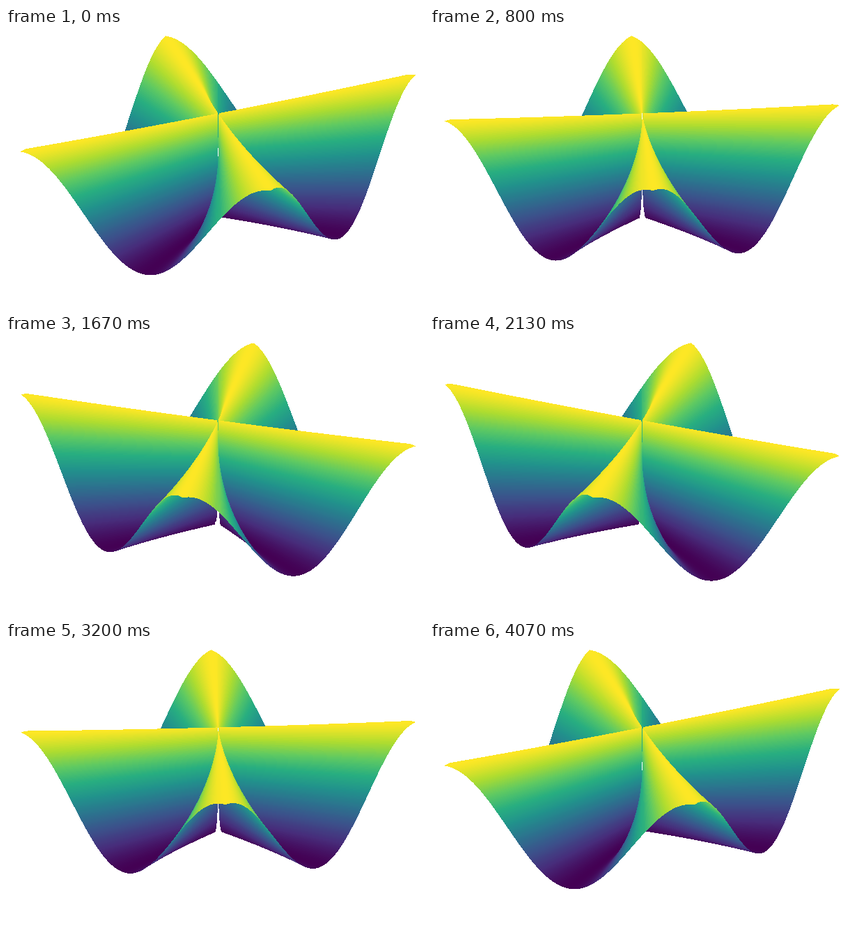
Animation, 600 px wide and 400 px high, one loop 4.14 s. Source, as an HTML page:

```html
<!DOCTYPE html>
<html lang="en">
<head>
<meta charset="utf-8">
<title>Swaying conoid</title>
<style>
  html, body { margin: 0; width: 100%; height: 100%; overflow: hidden; background: #fff; }
  svg { display: block; width: 600px; height: 400px; }
</style>
</head>
<body>
<svg viewBox="0 0 600 400" shape-rendering="crispEdges"><g id="surface"></g></svg>
<script>
const LOOP = 4140, STEPS = 62, STEP_MS = 200 / 3;
const CENTER = { x: 304.6, y: 122.4 };
const HALF_WIDTH = 283.4, HALF_DEPTH = 111, HEIGHT = 148.3;
const PER_EDGE = 240, COUNT = PER_EDGE * 4;

const VIRIDIS = ['440154', '472d7b', '3b528b', '2c728e', '21918c', '28ae80', '5ec962', 'addc30', 'fde725']
  .map(hex => [0, 2, 4].map(i => parseInt(hex.slice(i, i + 2), 16)));

const surface = document.getElementById('surface');
const heightAt = s => (1 + Math.cos(2 * Math.PI * s)) / 2;

function viridis(v) {
  const x = v * (VIRIDIS.length - 1);
  const i = Math.min(VIRIDIS.length - 2, Math.floor(x));
  const mix = VIRIDIS[i].map((c, n) => Math.round(c + (VIRIDIS[i + 1][n] - c) * (x - i)));
  return `rgb(${mix})`;
}

// Each wedge spans the axis and a short piece of the rim, so it has one height and one colour.
const wedges = Array.from({ length: COUNT }, (_, i) => {
  const path = document.createElementNS('http://www.w3.org/2000/svg', 'path');
  path.setAttribute('fill', viridis(heightAt((i + 0.5) / PER_EDGE)));
  return { path, index: i, depth: 0 };
});

function rim(s, corners) {
  s = (s + 4) % 4;
  const i = Math.floor(s), t = s - i;
  const a = corners[i], b = corners[(i + 1) % 4];
  return [a[0] + (b[0] - a[0]) * t, a[1] + (b[1] - a[1]) * t];
}

function draw(angle) {
  const dx = 220 * Math.sin(angle), dy = 161 * Math.sin(angle);
  const corners = [[-HALF_WIDTH, dy], [dx, HALF_DEPTH], [HALF_WIDTH, -dy], [-dx, -HALF_DEPTH]];

  const project = (s, radius) => {
    const [x, y] = rim(s, corners);
    const drop = HEIGHT * (1 - heightAt(s));
    return `${(CENTER.x + x * radius).toFixed(2)} ${(CENTER.y + y * radius + drop).toFixed(2)}`;
  };
  // The small hole round the axis widens at the valley floor.
  const hole = s => 0.006 + 0.025 * (1 - heightAt(s)) ** 8;

  for (const w of wedges) {
    const [x, y] = rim((w.index + 0.5) / PER_EDGE, corners);
    w.depth = y / Math.max(Math.abs(x), 1e-6);
    // Overlap the neighbour behind to avoid seams.
    const a = (w.index - (x < 0 ? 1 : 0)) / PER_EDGE;
    const b = (w.index + (x < 0 ? 1 : 2)) / PER_EDGE;
    w.path.setAttribute('d',
      `M${project(a, hole(a))}L${project(a, 1)}L${project(b, 1)}L${project(b, hole(b))}Z`);
  }
  const ordered = [...wedges].sort((p, q) => p.depth - q.depth);
  surface.replaceChildren(...ordered.map(w => w.path));
}

const start = performance.now();
let shown = -1;

function tick() {
  const time = (performance.now() - start) % LOOP;
  const step = Math.min(STEPS - 1, Math.floor((time + 5) / STEP_MS));
  const pose = Math.min(step, STEPS - 1 - step);
  if (pose !== shown) {
    draw((20 - pose * 4 / 3) * Math.PI / 180);
    shown = pose;
  }
  requestAnimationFrame(tick);
}
tick();
</script>
</body>
</html>
```
